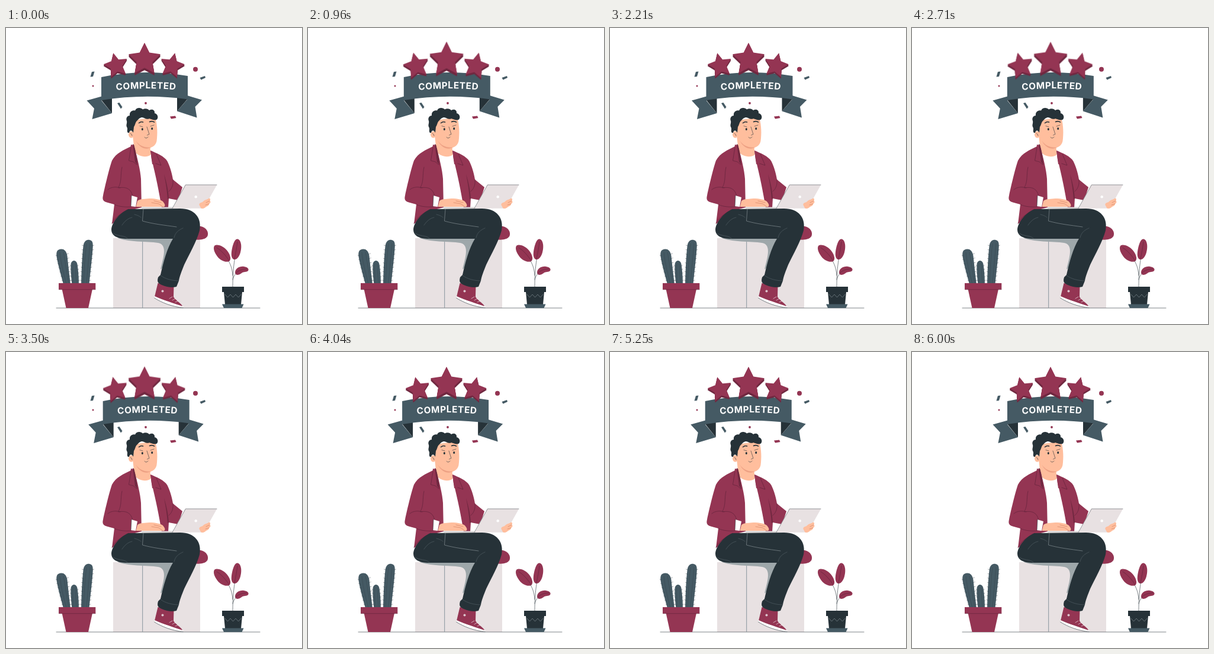
Write an HTML page that moves like this. It is 500x500 px and loops after 6.04 s.

```html
<!DOCTYPE html>
<html lang="en">
<head>
<meta charset="utf-8">
<title>Completed</title>
<style>
  html, body { margin: 0; width: 100%; height: 100%; overflow: hidden; background: #fff; }
  svg { display: block; width: 100vw; height: 100vh; }
  .wine { fill: #943553; }
  .deep { fill: #702840; }
  .ink { fill: #263238; }
  .slate { fill: #455a64; }
  .skin { fill: #ffbe9d; }
  .pale { fill: #e8e1e2; }
  .white { fill: #fff; }
  .line { fill: none; stroke: #263238; stroke-width: .6; stroke-linecap: round; stroke-linejoin: round; }
  .fold { stroke: #5c2038; }
  .seam { stroke: #7d8a90; }
  .crease { stroke: #c9795d; }
  .faint { opacity: .4; }
  .label { font: 700 15.4px Inter, "Open Sans", sans-serif; letter-spacing: .55px; fill: #fff; }
  #stars { transform-origin: 233.5px 55px; }
</style>
</head>
<body>
<svg viewBox="0 0 500 500">
  <!-- box and ground -->
  <rect class="pale" x="181" y="355" width="147" height="118"/>
  <path d="M230.700 355V472.500" fill="none" stroke="#87949c"/>
  <path d="M188 354C203 362 238 360 257 363C274 366 265 390 261 408L285 385L292 354Z" fill="#9ea7aa"/>
  <path class="line" d="M85 473H429"/>

  <!-- cactus -->
  <path class="slate" d="M97 433C92 414 87.500 399 85.500 386C84.500 377 87 374 93 373.500C99 373 102.500 378 103.500 385C105 400 107 416 109 433Z"/>
  <path class="slate" d="M111.500 433C110 420 109 408 109.500 400C110 391 119 391 120.500 399C122 409 123 420 123 433Z"/>
  <path class="slate" d="M127 433C127.500 410 128.500 386 130.500 369C131.500 360 136 357 141 358C146 359 147.500 362 146.500 373C145 394 142 416 140.500 433Z"/>
  <path class="line faint" d="M102 432C97 414 93 398 91 379M106 432C103 414 100 396 97 378M114 431C113 418 112 408 113 398M119 431C118 418 118 408 117 398M131 431C132 408 133 386 136 364M136 431C138 408 140 386 142 364"/>
  <path id="spines" class="line" style="stroke-width:.4"/>
  <path class="wine" d="M94.500 441H146L139 473H101.500Z"/>
  <rect class="wine" x="89" y="431" width="62.300" height="10.800"/>
  <path class="line fold" d="M89.500 441.800H151"/>

  <!-- leafy plant -->
  <path class="line" d="M383 437C383 420 384 400 388 381M383 418C382 404 378 393 366 381M383 425C385 416 391 411 403 408"/>
  <path class="wine" d="M352 368C357 364 369 369 375 378C379 384 381 391 377 394C371 397 360 392 355 383C351 377 350 371 352 368Z"/>
  <path class="wine" d="M391 356.500C397 357 399 369 396 379C394 386 390 392 385 391C380 389 380 381 382 372C384 363 387 356 391 356.500Z"/>
  <path class="wine" d="M387 413C387 406 395 402 402 403C408 404 411 407 409 410C406 413 402 411 398 414C393 418 387 418 387 413Z"/>
  <path class="line fold" d="M356 371C364 376 371 384 377 393M391 361C390 370 388 380 386 390M388 414C393 409 400 407 407 407"/>
  <path class="ink" d="M365 437H402V446H365ZM368 446H399L397 467H370Z"/>
  <path class="line" style="stroke:#8b989e" d="M370 450l4.500 5l4.500 -5l4.500 5l4.500 -5l4.500 5l4.500 -5"/>
  <path class="slate" d="M365 466.500H401.500L398.500 473H368Z"/>

  <!-- shoes -->
  <path class="wine" d="M322 335C334 333 342 341 341 349C340 357 328 359 316 357Z"/>
  <path class="wine" d="M256.500 431L251 454L298 471C299 467 285 459 283 454L283.500 435Z"/>
  <path class="white" d="M251 453C266 460 284 465 299.500 470.500L299 472.500C282 471 262 464 250 456Z"/>
  <path class="line" d="M250.500 456C263 464 281 471 299 472.500"/>
  <path class="line" style="stroke:#fff" d="M276 457l5 -3M281 460l5 -3M286 463l5 -2"/>
  <circle cx="264.500" cy="444.500" r="2" fill="#dcc5cd"/>

  <!-- torso -->
  <path class="white" d="M215 203H247L265 304H226Z"/>
  <path class="skin" d="M214 182L217 207C222 219 240 219 244.500 214L243 192Z"/>
  <path class="wine" d="M211 200C199 206 186 211 179 224C175 235 168 264 164 283C162 291 165 293 172 295L183 298L179 331L210 308L229 303L228 255C227 240 222 220 216 198Z"/>
  <path class="wine" d="M244 207C254 211 268 217 272.500 225C278 236 281 249 282 256L298 269L291 291L275 288L274 304H263C259 279 253 249 246 222Z"/>
  <path class="deep" d="M267 247C270 262 272 275 273 289L275 288C274 272 271 260 267 247Z"/>
  <path class="wine" d="M211 197L207.500 224L213 229L221 231L216 198Z"/>
  <path class="deep" d="M214 196L218 226L222 231C221 219 219 207 216 197Z"/>
  <path class="wine" d="M244 207L255 213L262 232L254 229L247 230Z"/>
  <path class="line fold" d="M211 202L207.500 224L215 226L221 231M254 213L262 232L253 229M190 270C201 268 211 270 214 284M172 273C178 268 186 268 193 270M196 235C193 247 196 259 190 269M282 256C283 265 280 272 275 276M183 298C190 302 204 303 211 302M179 330C184 320 194 313 207 306"/>

  <!-- head -->
  <path class="skin" d="M214 156L252 151C256 164 256 179 254.500 191C252 202 241 205 230 200C221 195 216 187 214 180Z"/>
  <ellipse class="skin" cx="211.500" cy="180" rx="4.500" ry="5.800"/>
  <path d="M219 190C225 199 235 203 245 201.500C238 206 226 204 219 190Z" fill="#eda184"/>
  <path class="skin" d="M216 185C224 197 235 202 246 201L253 191L225 181Z"/>
  <path class="ink" d="M206 177C203.500 174 206 171 204.500 168C202 164 205 161 204 157C202 152 205 148 209 148C208 142 213 138 218 139.500C220 134 228 134 231 137.500C236 135 240 137 242 139C247 136 252 139 251 144C256 145 258 151 255 154.500C251 157 246 154 242 153C237 156 233 150 229 151C225 152 224 154 222 156C218 159 219 163 216 167L215 177C212 171 209 173 208 177Z"/>
  <path class="line" style="stroke-width:1.600" d="M224.500 160.500Q228 157.500 231.500 159M242.500 158.500Q247 156.500 250.500 159"/>
  <path class="line" d="M226 165.500L231 167M244 166L250 164M238 167L242 179.500L238.500 181M234 184.500Q237 188 240 184M210 178Q213 179 213 182"/>
  <ellipse class="ink" cx="230.300" cy="171" rx="1.500" ry="1.900"/>
  <ellipse class="ink" cx="246.700" cy="170" rx="1.500" ry="1.900"/>

  <!-- legs -->
  <path class="ink" d="M207 306C193 311 179 328 178 340C178 352 189 356 204 356H282C272 372 266 395 261 417L257 421C255 428 256 431 263 434C272 438 281 439 288 437L292 427C293 420 297 410 301 400C309 383 322 361 327 342C331 321 319 305 294 305Z"/>
  <path class="line seam" style="opacity:.55" d="M181 347C189 352 199 350 205 355M213 320C206 321 200 327 196 333M217 315C222 316 226 318 228 320M261 418C269 424 281 427 292 427M284 354C286 345 292 341 299 338"/>
  <path class="line" d="M232 306L230.500 326C248 331 267 333 288 336" style="stroke:#a9b2b6;stroke-width:.5"/>

  <!-- laptop and hands -->
  <path class="white" d="M212 283L222 286L219 302L211 301Z"/>
  <path class="line" d="M212 283L211 301"/>
  <path class="skin" d="M222 292C227 288 235 289 242 288C252 288 262 290 265 293C268 297 270 300 267 302H219.500Z"/>
  <path class="line crease" d="M246 295L258 297L264 301M250 292L262 295"/>
  <path d="M229 302.500H283V305H229Z" fill="#d8d5d6"/>
  <path class="pale" d="M303 264.500H356.500L334 304.800H281Z"/>
  <path class="line" d="M281 304.500L303.300 265H356" style="stroke:#5d6468"/>
  <circle class="white" cx="320.700" cy="285.300" r="2.200"/>
  <path class="skin" d="M327 300C325 297 328 295 332 294C335 290 340 290 342 288C345 287 346 290 344 292C347 293 345 296 343 297C343 300 340 301 338 302C335 305 331 306 329 304Z"/>
  <path class="line crease" d="M338 295L344 292M337 299L343 297"/>

  <!-- confetti -->
  <path class="slate" d="M145 74L149.500 73.500L147 82L142.500 82.500Z"/>
  <path class="slate" d="M188 127L191.500 126L196.500 133.500L194 136.500Z"/>
  <path class="slate" d="M327.500 84L336 81L337 84L329.500 87.500Z"/>
  <path class="wine" d="M277 149.500L286 148.500L287.500 152L279 153.500Z"/>
  <circle class="wine" cx="320" cy="69.700" r="4"/>
  <circle class="wine" cx="236" cy="127" r="1.900"/>
  <circle class="wine" cx="147" cy="98" r="1.400"/>

  <!-- ribbon -->
  <g id="ribbon">
    <path class="slate" d="M161.500 115.500L136.500 122.500L149 136L145.500 154L179 144L161.500 123Z"/>
    <path class="slate" d="M306 114L331 121.500L319.500 133L322.500 151.500L289 140.500L306 121Z"/>
    <path class="ink" d="M161 121.500L179 117V144Z"/>
    <path class="ink" d="M307 119.500L289 116V140.500Z"/>
    <path class="slate" d="M161 83Q233 68 307 81V120.500Q234 110.500 161 122Z"/>
    <path id="arc" fill="none" d="M166 107.500Q236.500 97.600 307 106.500"/>
    <text class="label" text-anchor="middle"><textPath href="#arc" startOffset="50%">COMPLETED</textPath></text>
  </g>

  <g id="stars"></g>
</svg>
<script>
  const LOOP = 6040, SPAN = 6000;
  const byId = id => document.getElementById(id);

  // Star drawn as a dark lower side and a bright face.
  function star(cx, cy, radius, turn, depth) {
    const points = dy => Array.from({ length: 10 }, (_, i) => {
      const a = (turn + i * 36) * Math.PI / 180;
      const r = i % 2 ? radius * .5 : radius;
      return `${(cx + r * Math.sin(a)).toFixed(2)},${(cy + dy - r * Math.cos(a)).toFixed(2)}`;
    }).join(' ');
    const face = (name, dy) => `<polygon class="${name}" points="${points(dy)}"/>`;
    let out = '';
    for (let d = depth; d > 0; d--) out += face('deep', d);
    return out + face('wine', 0);
  }
  byId('stars').innerHTML =
    star(186, 63, 21.3, -13, 3) + star(280.500, 63, 21.3, 13, 3) + star(234, 53, 28.3, 0, 4);

  // Short spines along each straight run of the cactus.
  const runs = [
    [86, 385, 96, 427, -3], [103.500, 382, 108, 427, 3],
    [109.500, 402, 111, 427, -2], [121, 402, 123, 427, 2],
    [130.500, 368, 127.500, 427, -3], [146.500, 368, 141, 427, 3]
  ];
  const spines = ([x0, y0, x1, y1, out]) => {
    const count = Math.round((y1 - y0) / 7);
    let d = '';
    for (let i = 0; i <= count; i++) {
      const k = i / count;
      d += `M${x0 + (x1 - x0) * k - out / 3} ${y0 + (y1 - y0) * k}l${out} -1`;
    }
    return d;
  };
  byId('spines').setAttribute('d', runs.map(spines).join(''));

  // Steps are [percent of SPAN, value].
  function play(id, steps, css) {
    const frames = steps.map(([pct, v]) => ({ offset: pct / 100 * SPAN / LOOP, transform: css(v) }));
    frames.push({ offset: 1, transform: css(steps[0][1]) });
    byId(id).animate(frames, { duration: LOOP, iterations: Infinity });
  }
  play('ribbon',
    [[0, 0], [10, -1], [20, 2], [30, -4], [40, 4], [50, -4], [60, 4], [70, -4], [80, 2], [90, -1], [100, 0]],
    x => `translateX(${x}px)`);
  play('stars',
    [[0, 1], [10, 1.1], [26, 1], [40, 1], [50, 1.1], [60, 1], [100, 1]],
    s => `scale(${s})`);
</script>
</body>
</html>
```
